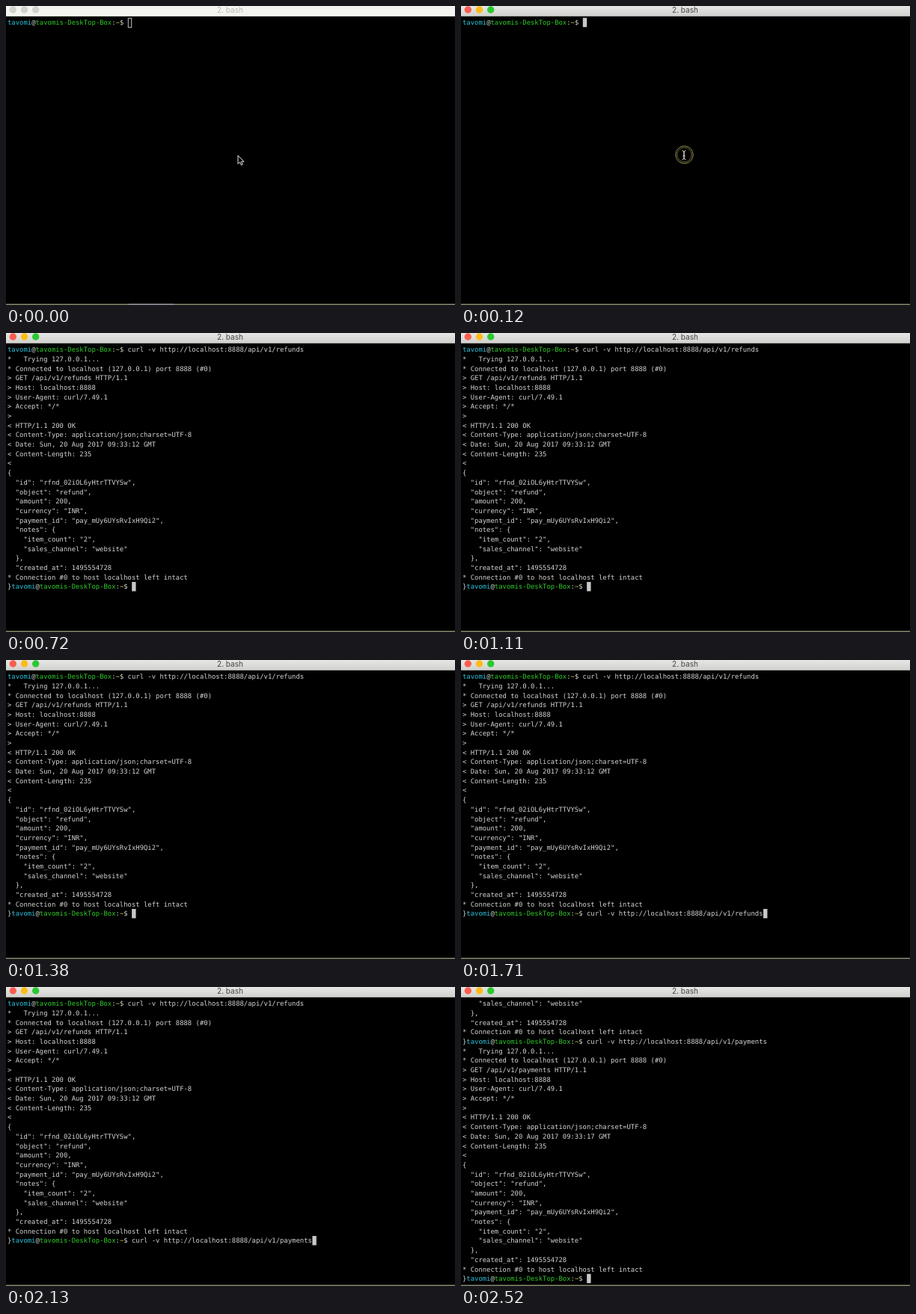
Recreate the animation shown at these times as an HTML page. Size 600x400 px, loop 2550 ms.

```html
<!DOCTYPE html>
<html lang="en">
<head>
<meta charset="utf-8">
<title>Terminal</title>
<style>
  html, body { margin: 0; width: 100%; height: 100%; overflow: hidden; background: #000; }
  svg { display: block; width: 600px; height: 400px; }
  #term text {
    font: 8.903px "DejaVu Sans Mono", monospace;
    white-space: pre;
    text-rendering: geometricPrecision;
    fill: #d4d4d2;
  }
  #term .user { fill: #2cc4dc; }
  #term .host { fill: #30cc28; }
  #term .path { fill: #d8d048; }
  #title { font: 10px Inter, sans-serif; text-anchor: middle; }
</style>
</head>
<body>
<svg viewBox="0 0 600 400">
  <defs>
    <linearGradient id="bar" x2="0" y2="1">
      <stop offset="0" stop-color="#e6e6e4"/>
      <stop offset="1" stop-color="#d2d2d0"/>
    </linearGradient>
  </defs>
  <rect width="600" height="400"/>
  <rect id="head" width="600" height="13"/>
  <rect id="edge" y="13" width="600" height="1"/>
  <g id="lights">
    <circle cx="9.3" cy="5" r="4.7"/>
    <circle cx="24.5" cy="5" r="4.7"/>
    <circle cx="39.7" cy="5" r="4.7"/>
  </g>
  <text id="title" x="299.5" y="9.2">2. bash</text>
  <rect y="398.5" width="600" height="1.5" fill="#88886c"/>
  <rect id="behind" x="164" y="398.5" width="60" height="1.5" fill="#8e8c9c"/>
  <g id="term"></g>
  <rect id="caret" width="5.4" height="12.4"/>
  <path id="arrow" d="M0 0V11.2L2.6 8.8L4.4 12.8L6.2 12L4.5 8.2H8Z" fill="#000" stroke="#e6e6e0"/>
  <g id="beam" fill="none" stroke="#d4d4cc">
    <path d="M295.5 193.5Q298 193.5 298 196V203Q298 205.5 295.5 205.5M300.5 193.5Q298 193.5 298 196V203Q298 205.5 300.5 205.5M296.5 200.5H299.5"/>
  </g>
  <g id="ring" fill="none" stroke="#949050">
    <circle cx="298.5" cy="199" r="11.7"/>
    <circle cx="298.5" cy="199" r="9.7" stroke="#68663c"/>
  </g>
</svg>
<script>
const LOOP = 2550, STEP = 30;
const CHAR = 5.36, ROW = 12.69, LEFT = 2, ROWS = 30;
const USER = 'tavomi', HOST = 'tavomis-DeskTop-Box';
const BASE = 'curl -v http://localhost:8888/api/v1/';
const OLD = 'refunds', NEW = 'payments';

// Times of the user's actions, in ms
const FOCUS = 90, RECALL = 300, RUN = 720, RECALL2 = 1440, EDIT = 1740, KEY = 22, RUN2 = 2220;

const $ = id => document.getElementById(id);
const show = (id, on) => $(id).setAttribute('display', on ? 'inline' : 'none');
const set = (id, attrs) => {
  for (const name in attrs) $(id).setAttribute(name, attrs[name]);
};

const output = (path, sec) => `*   Trying 127.0.0.1...
* Connected to localhost (127.0.0.1) port 8888 (#0)
> GET /api/v1/${path} HTTP/1.1
> Host: localhost:8888
> User-Agent: curl/7.49.1
> Accept: */*
>
< HTTP/1.1 200 OK
< Content-Type: application/json;charset=UTF-8
< Date: Sun, 20 Aug 2017 09:33:${sec} GMT
< Content-Length: 235
<
{
  "id": "rfnd_02iOL6yHtrTTVYSw",
  "object": "refund",
  "amount": 200,
  "currency": "INR",
  "payment_id": "pay_mUy6UYsRvIxH9Qi2",
  "notes": {
    "item_count": "2",
    "sales_channel": "website"
  },
  "created_at": 1495554728
* Connection #0 to host localhost left intact`.split('\n').map(s => [[s]]);

const prompt = (lead, cmd) => [
  [lead], [USER, 'user'], ['@'], [HOST, 'host'], [':'], ['~', 'path'], ['$ ' + cmd]
];

function secondCommand(t) {
  if (t < RECALL2) return '';
  if (t < EDIT) return BASE + OLD;
  const keys = Math.floor((t - EDIT) / KEY) + 1;
  return BASE + (keys <= OLD.length
    ? OLD.slice(0, OLD.length - keys)
    : NEW.slice(0, keys - OLD.length));
}

function screen(t) {
  const lines = [prompt('', t < RECALL ? '' : BASE + OLD)];
  if (t >= RUN) lines.push(...output(OLD, 12), prompt('}', secondCommand(t)));
  if (t >= RUN2) lines.push(...output(NEW, 17), prompt('}', ''));
  return lines.slice(-ROWS);
}

const escape = s => s.replace(/&/g, '&amp;').replace(/</g, '&lt;').replace(/>/g, '&gt;');
const span = ([s, cls]) => cls ? `<tspan class="${cls}">${s}</tspan>` : escape(s);

let last = '';
function drawText(lines) {
  const html = lines.map((line, i) =>
    `<text x="${LEFT}" y="${(25.2 + i * ROW).toFixed(2)}">${line.map(span).join('')}</text>`
  ).join('');
  if (html !== last) $('term').innerHTML = last = html;
}

function drawWindow(active) {
  const lights = active ? ['#fb5d50', '#fdbb18', '#2ac832'] : Array(3).fill('#d2d2cc');
  [...$('lights').children].forEach((c, i) => c.setAttribute('fill', lights[i]));
  set('head', { fill: active ? 'url(#bar)' : '#f4f4f0' });
  set('edge', { fill: active ? '#a8a8a0' : '#d2d2cc' });
  set('title', { fill: active ? '#444442' : '#b8b8b2' });
  show('behind', !active);
}

function drawCaret(lines, active) {
  const row = lines.length - 1;
  const col = lines[row].reduce((n, [s]) => n + s.length, 0);
  const inset = active ? 0 : 0.5;
  set('caret', {
    x: LEFT + col * CHAR + inset,
    y: 15.8 + row * ROW + inset,
    width: 5.4 - 2 * inset,
    fill: active ? '#c8c8c6' : 'none',
    stroke: active ? 'none' : '#c0c0bc'
  });
}

function drawMouse(t) {
  const near = Math.min(t / 60, 1);
  set('arrow', { transform: `translate(${310 - 12 * near} ${200 - 2 * near})` });
  show('arrow', t < FOCUS);
  show('beam', t >= FOCUS && t < RECALL);
  show('ring', t >= 60 && t < 150);
}

function draw(ms) {
  const t = Math.floor((ms % LOOP) / STEP) * STEP;
  const active = t >= FOCUS;
  const lines = screen(t);
  drawWindow(active);
  drawText(lines);
  drawCaret(lines, active);
  drawMouse(t);
}

const start = performance.now();
function tick() {
  draw(performance.now() - start);
  requestAnimationFrame(tick);
}
tick();
</script>
</body>
</html>
```
